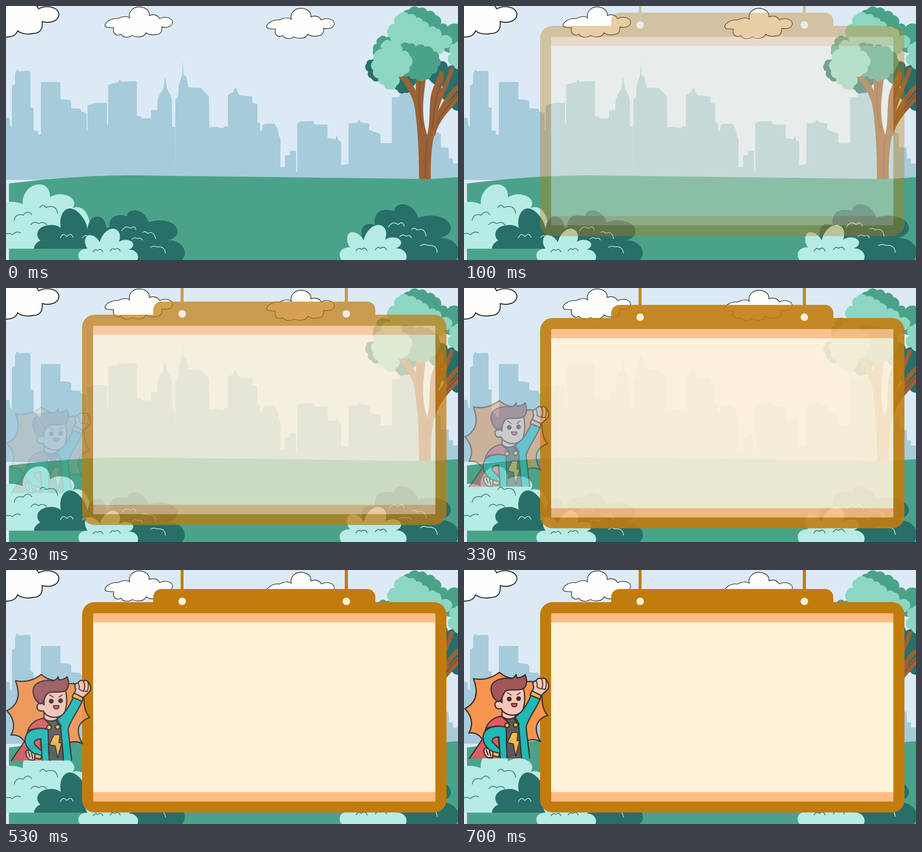
An HTML page that plays this animation: 998x561 px, repeating every 5.01 s.

```html
<!DOCTYPE html>
<html lang="en">
<head>
<meta charset="utf-8">
<title>Park billboard</title>
<style>
  html, body { margin: 0; width: 100%; height: 100%; overflow: hidden; background: #dceaf6; }
  svg { display: block; width: 998px; height: 561px; }
  .city { fill: #a6cbdb; }
  .grass, .mid { fill: #4aa388; }
  .pale { fill: #b6ebe6; }
  .dark { fill: #286f6a; }
  .mint { fill: #8dd6c1; }
  .wood { fill: #9a6235; }
  .branch { fill: none; stroke: #9a6235; }
  .grain { fill: none; stroke: #8a5430; stroke-width: 3; }
  .cloud { fill: #fefefc; stroke: #2b2a2a; stroke-width: 1.4; stroke-linejoin: round; }
  .onPale, .onDark { fill: none; stroke-width: 1.5; stroke-linecap: round; }
  .onPale { stroke: #286f6a; }
  .onDark { stroke: #b6ebe6; }
  .frame { fill: #c27c0e; }
  .cream { fill: #fff2d8; }
  .peach { fill: #ffbc82; }
  #hero { stroke: #3a3030; stroke-width: 2.8; stroke-linejoin: round; stroke-linecap: round; }
  .burst { fill: #f7954f; }
  .cape { fill: #e25a60; }
  .suit { fill: #5c595d; }
  .teal { fill: #1fb9b5; }
  .gold { fill: #fdb745; }
  .skin { fill: #fbc5b8; }
  .hair { fill: #a1565a; }
  .ink { fill: #3a3030; }
  .line { fill: none; }
</style>
</head>
<body>
<svg viewBox="0 0 998 561">
  <defs>
    <path id="cloud" class="cloud" d="M238,48C230,47 220,49 218.500,43C219,34 235,26 247,28C258,22 270,22 273,27
      C269,12 282,2 293,2C307,2 318,10 316,21C325,17 336,20 339,28C350,22 367,25 368,36C367,46 354,49 344,46
      C345,57 341,63 331,63C323,65 313,63 309,59C306,70 288,70 279,65C272,71 257,70 254,62C245,68 234,61 238,48Z"/>
    <g id="shrubs">
      <path class="dark" d="M200,561L203,503C205,490 218,487 229,492C226,470 238,457 267,464C268,446 304,444 315,478
        C335,469 376,473 379,497C380,508 369,514 357,518C378,516 395,530 395,546Q394,556 388,561Z"/>
      <path class="onDark" d="M256,496q7,-13 19,-5q9,-8 12,3M302,500q6,-4 10,2q16,-6 18,12
        M278,515q6,-6 13,-1q7,-4 10,3M319,533q6,-5 14,-1q18,-2 19,14"/>
      <path class="pale" d="M163,561C156,550 160,536 180,536C171,524 173,507 184,506C195,506 204,515 207,522
        C211,505 225,490 239,492C254,496 253,513 249,521C261,513 279,516 281,526C281,533 276,536 270,538
        C285,537 296,549 290,561Z"/>
      <path class="onPale" d="M192,543q5,-8 10,-3q8,-6 12,3M230,541q5,-8 10,-3q8,-6 12,3"/>
    </g>
  </defs>

  <path class="city" d="M0,384V247H8L9,262L13,268V176L20,172V149L25,140L28,144L52,143L54,148V224L61,225V275L70,276L71,284H77
    V168H120V206L138,207L144,210V226L164,227L166,233L178,236V275H180V219L200,214H223V262H225.500V174L248,168L251,162L254,167
    L289,166V243L298,244L300,248H320V230H334L335,206L342,190L347,184L351,157L356,184L362,194L366,206L367,267H373V384Z"/>
  <path class="city" d="M373,384L374,207L380,200L381,178L386,160L389,152L390.500,121L392,152L398,156L403,180L430,181L448,200
    L449,268L463,267L479,270L483,265L490,267V196L502,190L504,183L508,181L511,190L516,197L544,200V214L555,216V256L561,260V276H565
    L567,263L573,260H593L600,272L602,285L606,293V356H616V330L627,329V320H640L641,367V384Z"/>
  <path class="city" d="M640,384V367H643V260L650,255L678,254L682,262H710V292L727,294L731,285L734,297L740,300V352L756,349V259
    L775,258L779,251L784,257L802,260V273L827,283V303H852V202L868,201L870,195L915,190V384Z"/>
  <path class="city" d="M912,384V290H940L945,275L955,280L960,283V312L977,313L978,336L987,337V348H998V384Z"/>

  <use href="#cloud" transform="translate(-453.400 -37) scale(1.55)"/>
  <use href="#cloud"/>
  <use href="#cloud" x="357" y="3"/>

  <path class="grass" d="M6.500,392C80,383 170,374 280,374L600,378L910,382H938Q970,380 998,378V561H6.500Z"/>

  <g id="back"></g>
  <path class="branch" stroke-width="13" d="M941,285C950,245 980,222 1002,195"/>
  <path class="branch" stroke-width="10" d="M950,250C968,215 985,185 1002,177"/>
  <path class="branch" stroke-width="9" d="M944,262C950,205 975,175 985,136"/>
  <path class="wood" d="M912,382C912,300 906,240 900,212C892,190 880,170 866,155L881,152C890,165 899,174 905,187L904,157L927,155
    C925,190 913,235 930,285C937,260 934,220 938,198C942,178 952,165 958,142L966,146C968,165 958,190 954,210
    C952,240 958,250 947,278C940,305 937,340 938,382Z"/>
  <path class="grain" d="M926,380C927,340 926,315 931,290M914,165C909,200 913,240 919,270M962,170C946,200 946,235 941,270M998,196C978,220 960,235 951,260"/>
  <g id="front"></g>

  <path class="pale" d="M-2,434C8,431 28,433 37,438C35,415 52,393 75,394C92,395 98,410 97,423C108,412 148,412 151,436
    Q150,442 147,446C165,440 180,450 186,482L170,536H-2Z"/>
  <path class="onPale" d="M18,473q4,-16 20,-11q10,-13 19,-1M75,445q6,-10 13,0q23,-8 26,13M55,483q8,-10 17,-2q10,-7 18,2M-2,504q10,-4 16,1q10,-9 18,-4"/>
  <path class="dark" d="M62,536C61,528 70,520 76,518C63,508 68,486 95,484C106,482 115,486 121,490C117,470 124,448 141,447
    C160,448 178,475 180,493C182,475 190,465 202,465C215,466 221,478 221,490L232,488V536Z"/>
  <path class="onDark" d="M120,512q6,-13 14,-3q10,-10 14,2M169,512q5,-9 14,-2"/>
  <use href="#shrubs"/>
  <use href="#shrubs" transform="translate(557.800 -67.300) scale(1.12)"/>

  <g id="board">
    <path class="frame" d="M385.500,-5h6.500V42H748V-5h7V42H797.500a18,18 0 0 1 18,18V71H945a27.500,27.500 0 0 1 27.500,27.500V508
      a27.500,27.500 0 0 1 -27.500,27.500H195.500a27.500,27.500 0 0 1 -27.500,-27.500V98.500a27.500,27.500 0 0 1 27.500,-27.500H325V60
      a18,18 0 0 1 18,-18H385.500Z"/>
    <rect class="peach" x="192.500" y="95.500" width="755.500" height="416" rx="2"/>
    <rect class="cream" x="192.500" y="115.500" width="755.500" height="375.500"/>
    <circle class="cream" cx="389" cy="69.300" r="8.300"/>
    <circle class="cream" cx="751.500" cy="69.300" r="8.300"/>
  </g>

  <g id="hero">
    <path class="burst" d="M78,226Q93,240 118,240Q136,248 150,246L172,280Q173,310 185,321Q164,328 160,345Q158,362 169,379
      Q155,372 142,376H42Q30,357 11,360Q26,332 2,306Q39,288 21,240Q52,246 78,226Z"/>
    <path class="cape" stroke="none" d="M84,322C62,328 46,345 42,370L12,416H100V335Z"/>
    <path class="line" d="M100,335L84,322C62,328 46,345 42,372L12,416"/>
    <path class="suit" stroke="none" d="M86,338L98,328L118,324L130,350V416H88Z"/>
    <path class="teal" stroke="none" d="M110,326C130,314 140,296 148,277L168,285C160,306 142,327 137,347L145,416H127L121,345Z"/>
    <path class="line" d="M110,326C130,314 140,296 148,277L168,285C160,306 142,327 137,347L145,415M127,415L121,345L110,326"/>
    <path class="teal" stroke="none" d="M93,347C72,342 49,347 44,361C38,377 46,390 62,402L80,416H95Z"/>
    <path class="line" d="M95,415L93,347C72,342 49,347 44,361C38,377 46,390 62,402M80,415L77,368"/>
    <path class="cape" d="M76,369C67,368 60,374 63,380L78,395Z"/>
    <path class="cape" d="M83,323L99,338L92,347C80,343 65,344 48,350C54,334 67,325 83,323Z"/>
    <path class="gold" d="M64,401L79,405L76,413L63,410Z"/>
    <path class="skin" d="M64,402C56,396 47,389 44,396C43,404 47,412 54,415H63Z"/>
    <path class="line" d="M49,397L53,408M56,399L59,411"/>
    <path class="gold" stroke-width="2" d="M106,359H119L117,377H123L114,411L109,384L96,381Z"/>
    <path class="skin" d="M84,306V323Q96,334 113,325L112,312Z"/>
    <path class="line" d="M113,325L122,341"/>
    <circle class="gold" cx="95" cy="343" r="5"/>
    <circle class="gold" cx="114" cy="342" r="5"/>
    <path class="skin" d="M84,290C82,262 108,250 131,260C136,278 134,295 131,306C126,319 112,322 100,320C90,317 84,312 82,306
      C72,309 67,302 69,294C72,288 80,288 84,293Z"/>
    <path class="hair" d="M76,291C62,285 55,262 64,250C72,241 90,237 103,240Q112,238 115,231L117,238Q128,238 135,231
      C141,247 138,259 129,263C116,267 104,263 95,266C83,272 87,287 76,291Z"/>
    <circle class="ink" stroke="none" cx="100" cy="285" r="5.300"/>
    <circle class="ink" stroke="none" cx="120.500" cy="284" r="5.300"/>
    <path class="line" stroke-width="2" d="M96,271L104,276M117,276L124,271"/>
    <path class="cape" stroke-width="2.400" d="M105,295H117Q117,302 111,302Q105,302 105,295Z"/>
    <path class="skin" d="M151,269L154,258C150,249 153,245 159,245Q163,237 171,240Q179,237 183,245C189,253 188,262 182,266L171,277Z"/>
    <path class="line" stroke-width="2.200" d="M159,245Q163,252 161,258M171,241Q176,250 172,261M181,244Q183,252 180,263M161,258Q168,264 180,263"/>
    <path class="gold" d="M150,267L170,277L168,285L146,276Z"/>
  </g>
</svg>
<script>
const LOOP = 5010, RISE = 500, SHIFT = 42.5, FPS = 30, LAST = 21;
const $ = id => document.getElementById(id);

// Clockwise outline whose sides bulge out as arcs.
function puff(group, kind, points) {
  const p = points.split(' ').map(s => s.split(',').map(Number));
  let d = 'M' + p[0];
  p.forEach(([x, y], i) => {
    const [nx, ny] = p[(i + 1) % p.length];
    const r = 0.62 * Math.hypot(nx - x, ny - y);
    d += `A${r},${r} 0 0 1 ${nx},${ny}`;
  });
  const path = document.createElementNS('http://www.w3.org/2000/svg', 'path');
  path.setAttribute('class', kind);
  path.setAttribute('d', d);
  $(group).append(path);
}

puff('back', 'dark', '840,140 825,164 807,160 800,145 796,127 807,119');
puff('back', 'dark', '862,155 900,150 898,178 880,192 864,186 858,170');
puff('back', 'dark', '938,130 960,122 975,135 1010,145 1010,225 985,225 976,208 962,198 964,180 970,170 945,172');
puff('front', 'mid', '875,25 890,8 912,5 930,12 948,20 960,40 975,46 1005,46 1005,95 960,90 900,60');
puff('front', 'mid', '818,112 811,97 819,83 824,70 840,69 852,74 870,80 870,110');
puff('front', 'mint', '848,68 845,48 859,40 866,20 890,19 906,26 920,34 934,48 950,50 961,62 960,70 980,68 982,85 968,92 955,106 940,104 925,92 905,88 880,90');
puff('front', 'mid', '870,88 890,84 905,90 925,90 944,100 956,115 953,135 940,150 925,162 905,160 890,154 875,150');
puff('front', 'mint', '830,95 832,81 850,78 868,85 874,100 891,109 891,135 880,150 866,155 862,176 847,184 835,174 822,160 811,142 812,120');
puff('front', 'mint', '980,92 990,84 1010,82 1010,138 987,130 976,118 985,106');

function rise(id, ms, from) {
  const u = Math.min(1, Math.max(0, ms / RISE));
  const left = (1 - u) ** 2;
  $(id).setAttribute('opacity', 1 - left);
  $(id).setAttribute('transform', `translate(0 ${from * left})`);
}

// Motion advances at 30 steps a second, on whole hundredths.
function draw(t) {
  const step = Math.min(LAST, Math.floor(Math.floor(t / 10) * 0.3 + 0.101));
  const ms = step * 1000 / FPS;
  rise('board', ms, -SHIFT);
  rise('hero', ms - 200, SHIFT);
}

const start = performance.now();
function tick() {
  draw((performance.now() - start) % LOOP);
  requestAnimationFrame(tick);
}
tick();
</script>
</body>
</html>
```
